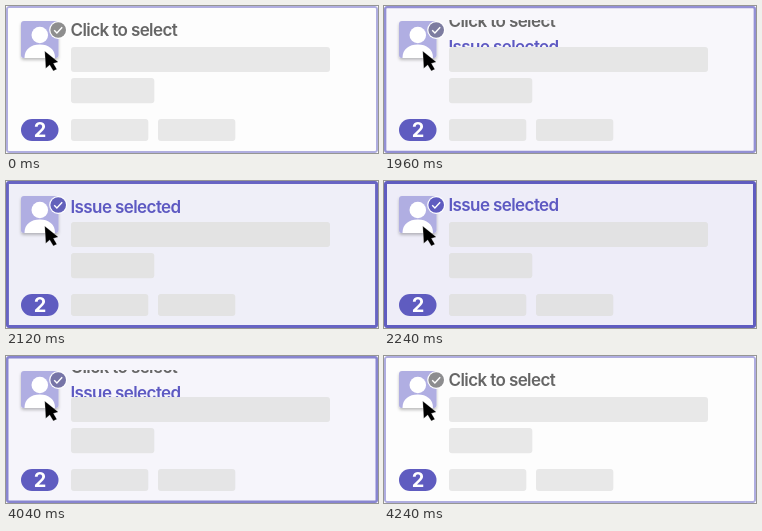
An HTML page for the animation above (5.08 s loop, 372 px wide and 147 px high).

```html
<!DOCTYPE html>
<html lang="en">
<head>
<meta charset="utf-8">
<title>Select an issue</title>
<style>
  html, body { margin: 0; width: 100%; height: 100%; overflow: hidden; background: #fff; }
  svg { display: block; width: 372px; height: 147px; border-radius: 3px; }
  text { font-family: Inter, "Liberation Sans", sans-serif; font-weight: 600; }
  .title { font-size: 17px; letter-spacing: -.035em; }
  .badge { font-size: 20px; font-weight: 700; fill: #fff; text-anchor: middle; }
  #card { fill: #fdfdfd; stroke: #b0aee0; stroke-width: 2px; }
  #check { fill: #8e8e8e; }
  #bars { fill: #e8e8e8; }
</style>
</head>
<body>
<svg viewBox="0 0 372 147">
  <defs>
    <clipPath id="titleArea"><rect x="60" y="14" width="300" height="27"/></clipPath>
    <clipPath id="avatarArea"><rect x="15" y="15" width="37.5" height="37" rx="3"/></clipPath>
    <filter id="shadow" x="-30%" y="-30%" width="160%" height="160%">
      <feDropShadow dx="0" dy="2" stdDeviation="1.5" flood-opacity=".25"/>
    </filter>
  </defs>
  <rect id="card" x="1" y="1" width="370" height="145" rx="2"/>

  <rect x="15" y="15" width="37.5" height="37" rx="3" fill="#b0aee2" filter="url(#shadow)"/>
  <g clip-path="url(#avatarArea)" fill="#fff">
    <circle cx="33.8" cy="29" r="8.3"/>
    <path d="M18.5 52C18.5 43 25 38.5 33.8 38.5S49 43 49 52Z"/>
  </g>
  <circle cx="52.2" cy="24" r="9" fill="#fff"/>
  <circle id="check" cx="52.2" cy="24" r="7.8"/>
  <path d="M48.2 24.3L50.9 27L56.2 21.3" fill="none" stroke="#fff" stroke-width="1.4"/>
  <path d="M38.7 45L39.7 62.5L43.7 59L47.3 65L50.9 63.2L47.5 57.4L52.3 56Z" fill="#000" stroke="#fff" stroke-opacity=".5" stroke-width=".6"/>

  <g clip-path="url(#titleArea)">
    <g id="titles">
      <text class="title" x="64.5" y="30" fill="#666">Click to select</text>
      <text class="title" x="64.5" y="56" fill="#5d59c2">Issue selected</text>
    </g>
  </g>

  <g id="bars">
    <rect x="65" y="41" width="259" height="25" rx="3"/>
    <rect x="65" y="72" width="83.3" height="25.3" rx="3"/>
    <rect x="65" y="113" width="77.3" height="22" rx="3"/>
    <rect x="152" y="113" width="77.3" height="22" rx="3"/>
  </g>

  <rect x="15" y="113" width="37.5" height="22" rx="11" fill="#5f5cc0"/>
  <text class="badge" x="34.1" y="131.2">2</text>
</svg>
<script>
  const LOOP = 5080, TICK = 40;
  const SELECT = { start: 1868, end: 2268 };
  const DESELECT = { start: 3934, end: 4294 };

  // Each part eases from its idle look to its selected look and back.
  const parts = {
    card: [{ fill: '#fdfdfd', stroke: '#b0aee0', strokeWidth: '2px' },
           { fill: '#eeedf8', stroke: '#5f5cc0', strokeWidth: '4px' }],
    check: [{ fill: '#8e8e8e' }, { fill: '#5f5cc0' }],
    bars: [{ fill: '#e8e8e8' }, { fill: '#e2e2e3' }],
    titles: [{ transform: 'translateY(0px)' }, { transform: 'translateY(-26px)' }]
  };

  const players = Object.entries(parts).map(([id, [idle, selected]]) => {
    const key = (look, ms) => ({ ...look, offset: ms / LOOP, easing: 'ease' });
    const player = document.getElementById(id).animate([
      key(idle, 0), key(idle, SELECT.start), key(selected, SELECT.end),
      key(selected, DESELECT.start), key(idle, DESELECT.end), key(idle, LOOP)
    ], { duration: LOOP, fill: 'both' });
    player.pause();
    return player;
  });

  const start = performance.now();
  function draw() {
    const time = (performance.now() - start) % LOOP;
    const tick = Math.floor(time / TICK) * TICK;
    for (const player of players) player.currentTime = tick;
    requestAnimationFrame(draw);
  }
  draw();
</script>
</body>
</html>
```
